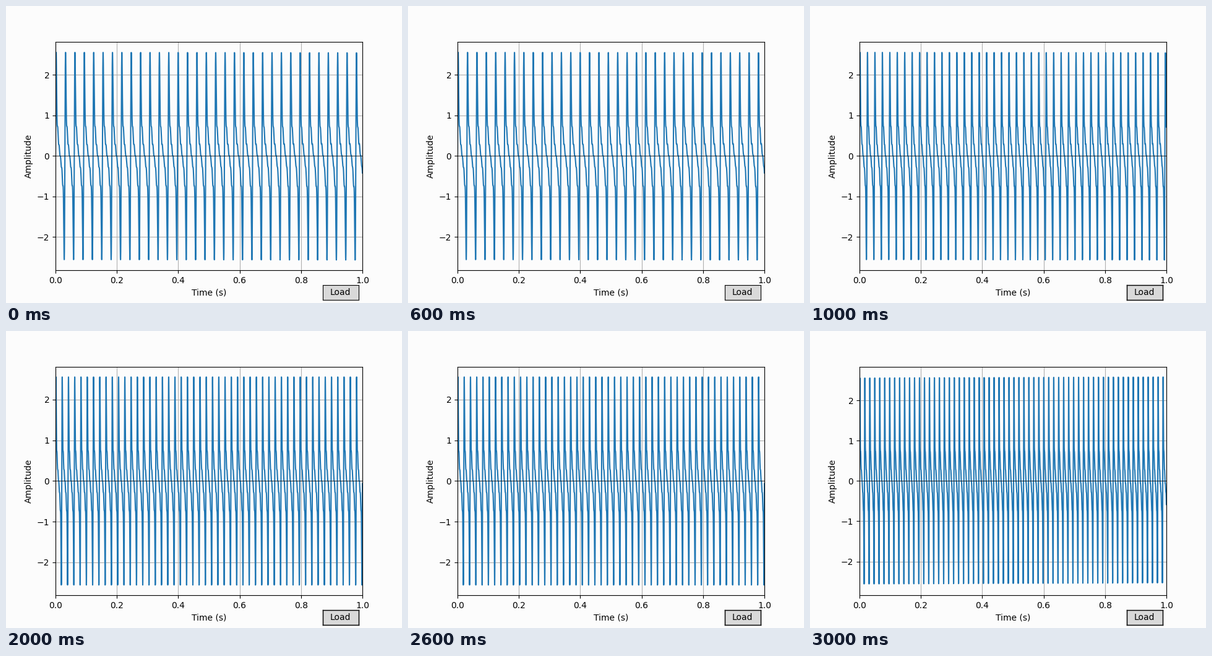
Write a matplotlib script that moves like this. It is 640 by 480 pixels and loops after 4000 ms.

```python
import numpy as np
import matplotlib.pyplot as plt
from matplotlib.animation import FuncAnimation

RATE = 44100
HARMONICS = 6
NOTES = [24, 28, 31, 35]  # MIDI: C1, E1, G1, B1
PAPER = "#fcfcfc"

time = np.arange(RATE) / RATE


def tone(midi):
    """Harmonic stack with linearly falling strength; pitches in whole cents of a hertz."""
    base = 440 * 2 ** ((midi - 69) / 12)
    wave = np.zeros_like(time)
    for k in range(1, HARMONICS + 1):
        strength = 1 - (k - 1) / HARMONICS
        wave += strength * np.sin(2 * np.pi * round(k * base, 2) * time)
    return wave


waves = [tone(note) for note in NOTES]

fig = plt.figure(figsize=(6.4, 4.8), dpi=100, facecolor=PAPER)
ax = fig.add_axes([0.125, 0.11, 0.775, 0.77], facecolor=PAPER)
line, = ax.plot(time, waves[0], color="#1f77b4", lw=1.5)
ax.axhline(0, color="black", lw=0.5)
ax.set_xlim(0, 1)
ax.set_xlabel("Time (s)")
ax.set_ylabel("Amplitude")
ax.grid(True)

button = fig.add_axes([0.8, 0.01, 0.09, 0.05], facecolor="0.85")
button.set_xticks([])
button.set_yticks([])
button.text(0.5, 0.5, "Load", ha="center", va="center",
            transform=button.transAxes)


def update(frame):
    wave = waves[frame]
    line.set_ydata(wave)
    limit = 1.1 * np.abs(wave).max()
    ax.set_ylim(-limit, limit)
    for spine in button.spines.values():
        spine.set_linewidth(0.8 if frame == 0 else 1.05)
    return line,


anim = FuncAnimation(fig, update, frames=len(NOTES), init_func=lambda: (line,),
                     interval=1000, repeat=True, repeat_delay=0, blit=False)
plt.show()
```
